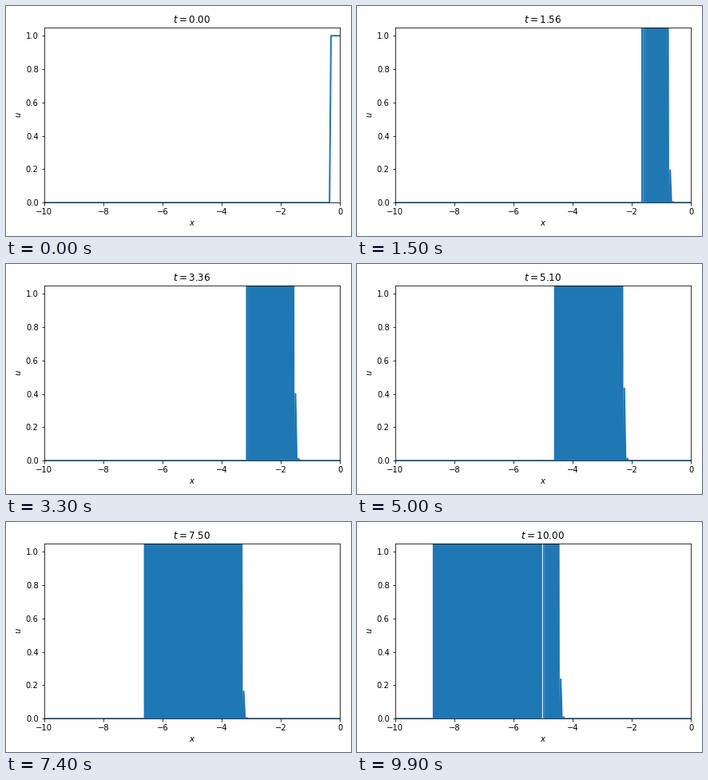
Animation, 432 px wide and 288 px high, one loop 10 s. Source, as a matplotlib script:

```python
import numpy as np
import matplotlib.pyplot as plt
from matplotlib.animation import FuncAnimation

FRAMES, T_END = 100, 10.0
DX, DT = 0.05, 0.06  # Courant number 1.2: deliberately unstable

x = np.linspace(-10, 0, 201)
times = np.linspace(0, T_END, FRAMES)


def step(u, dt):
    """One upwind step of u_t = u_x with zero inflow on the right."""
    c = dt / DX
    new = np.zeros_like(u)
    new[:-1] = u[:-1] + c * (u[1:] - u[:-1])
    return new


def solve():
    """Return (t, u) for the first step reaching each output time."""
    t, u = 0.0, np.where(x > -0.325, 1.0, 0.0)
    states = []
    for target in times:
        while t < target - 1e-9:
            dt = min(DT, T_END - t)
            u = step(u, dt)
            t += dt
        states.append((t, u))
    return states


states = solve()

fig, ax = plt.subplots(figsize=(6, 4), dpi=72)
line, = ax.plot(x, states[0][1], lw=2)
ax.set_xlim(-10, 0)
ax.set_ylim(0, 1.05)
ax.set_xlabel("$x$")
ax.set_ylabel("$u$")
title = ax.set_title("$t=0.00$")
fig.tight_layout()


def update(i):
    t, u = states[i]
    line.set_ydata(u)
    title.set_text(f"$t={t:.2f}$")
    return line, title


anim = FuncAnimation(fig, update, frames=FRAMES, interval=100,
                     repeat=True, repeat_delay=0)
plt.show()
```
